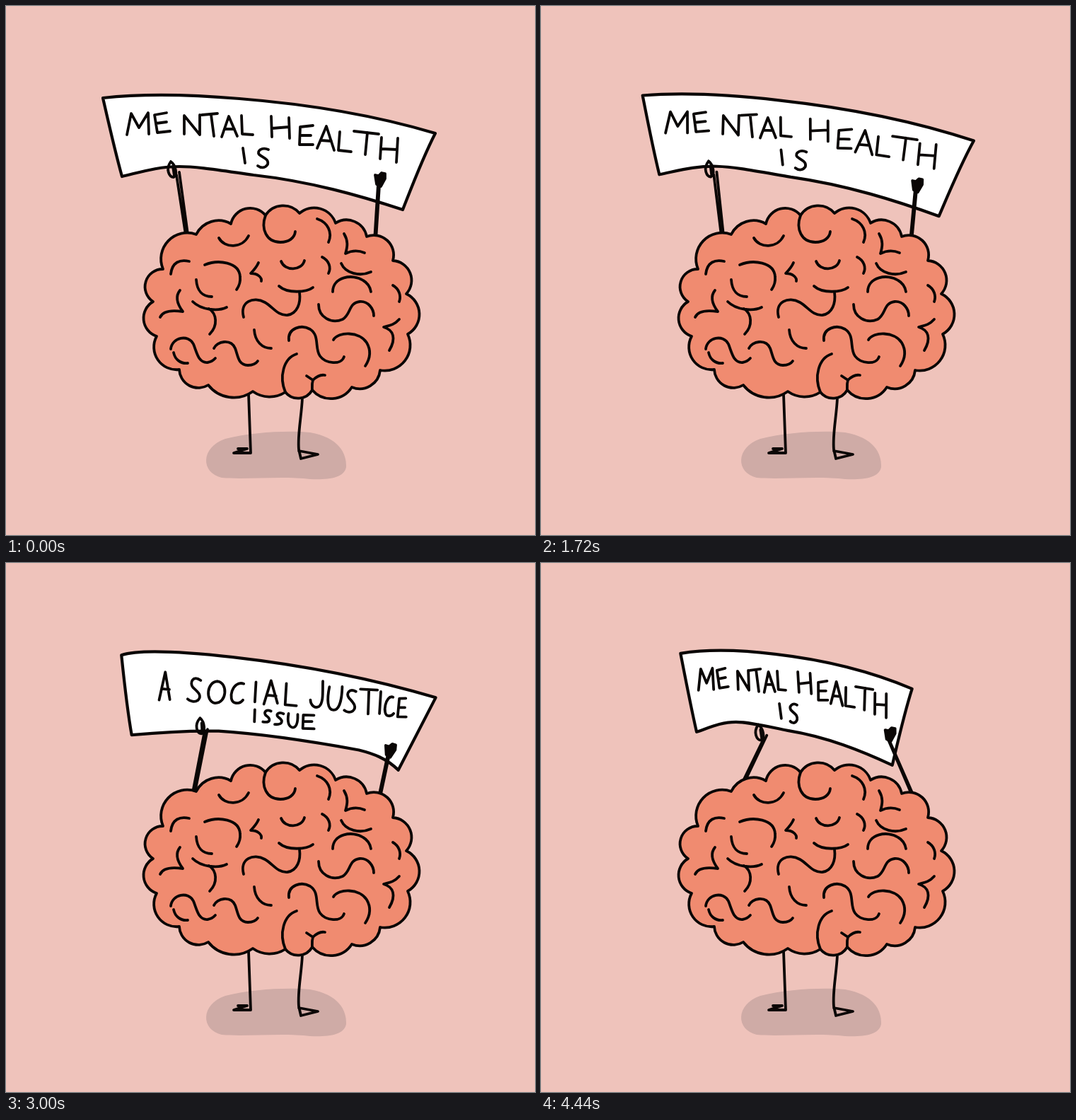
Animation, 748 px wide and 748 px high, one loop 4.48 s. Source, as an HTML page with a canvas:

```html
<!DOCTYPE html>
<html lang="en">
<head>
<meta charset="utf-8">
<title>Mental health is a social justice issue</title>
<style>
html, body { margin: 0; width: 100%; height: 100%; overflow: hidden; background: #efc3bb; }
canvas { display: block; width: 748px; height: 748px; }
</style>
</head>
<body>
<canvas id="stage" width="748" height="748" role="img" aria-label="A brain holds up a sign: Mental health is a social justice issue"></canvas>
<script>
const ctx = document.getElementById('stage').getContext('2d');
const INK = '#0a0605', LOOP = 4480, STEP = 40, LINE = 3.8;
const PIVOT = [256, 350], FLIP_X = 318;
const path = (...parts) => new Path2D(parts.join(''));

function draw(p, width, fill) {
  if (fill) { ctx.fillStyle = fill; ctx.fill(p); }
  if (width) { ctx.lineWidth = width; ctx.stroke(p); }
}

// Each bump: radius, end x, end y
const bumps = [
  [37, 269, 323], [35, 318, 308], [28, 367, 296], [30, 415, 293], [32, 466, 307],
  [29, 510, 326], [28, 547, 360], [28, 566, 407], [32, 568, 464], [36, 529, 515],
  [29, 489, 539], [35, 433, 543], [23, 395, 546], [41, 349, 545], [46, 286, 536],
  [27, 245, 514], [32, 213, 467], [27, 208, 418], [25, 222, 372]
];
const brain = path('M222 372', ...bumps.map(([r, x, y]) => `A${r} ${r} 0 0 1 ${x} ${y}`), 'Z');

const foldsTop = path(
  'M301 328C309 343 334 343 343 325',
  'M367 296C360 315 368 334 388 334C400 334 408 328 409 319',
  'M440 301C455 306 462 320 456 334',
  'M478 322C484 332 483 340 480 350C490 345 500 346 507 349',
  'M474 364C480 378 500 383 516 376',
  'M233 379C235 362 246 358 259 361',
  'M281 366C300 358 330 362 331 383C332 393 328 398 326 401',
  'M357 363C354 370 350 374 346 378C356 378 362 384 361 389',
  'M389 361C394 375 418 375 422 360',
  'M386 396C398 407 425 405 434 398',
  'M447 355C457 360 460 370 456 378');
const foldsMid = path(
  'M462 404C462 383 490 378 505 388C512 392 515 398 516 404',
  'M547 395C556 400 559 410 556 418',
  'M269 387C270 403 278 411 291 411',
  'M264 418C276 430 300 432 312 426',
  'M287 428C298 435 300 452 288 464',
  'M218 440C222 430 236 430 250 432C244 424 238 412 246 402',
  'M336 440C330 418 350 410 366 419C378 426 384 438 398 437C412 435 417 420 415 405',
  'M442 422C442 440 460 450 476 443C488 436 484 420 500 418C512 417 520 428 520 438');
const foldsLow = path(
  'M556 443C548 452 540 452 534 454C548 458 552 470 542 487',
  'M351 458C352 474 362 484 375 484',
  'M400 473C398 455 418 450 430 457C444 466 436 484 444 495C452 506 474 508 478 496',
  'M463 472C470 460 500 460 510 476C517 488 514 500 508 509',
  'M233 485C235 468 258 464 265 478C270 490 272 505 285 504C292 503 294 500 296 498',
  'M237 490C239 500 247 506 257 505',
  'M294 484C298 474 318 470 324 484C328 494 328 508 342 508C350 508 354 505 356 502',
  'M411 492C392 498 386 525 395 546',
  'M425 523L434 529C440 523 446 521 451 522M434 529C432 535 433 540 433 543');

const shadow = path('M310 612C350 602 400 600 430 603C470 610 482 632 481 652C478 668 455 670 430 669',
  'C390 664 340 670 305 667C275 660 275 624 310 612Z');
const legs = path('M343 549L346 632L322 632L341 626L328 626',
  'M419 554C418 580 412 605 414 627L417 640L441 634L414 629');

const signs = [
  {
    board: path('M137 130C190 124 260 125 330 131C430 139 520 154 607 180C589 215 574 255 561 288',
      'C500 268 430 248 350 239C300 232 270 227 245 227C215 227 190 235 164 241C154 205 145 165 137 130Z'),
    letters: [
      path('M171 182L177 152L188 172L201 151L202 181',            // MENTAL
        'M227 151L210 154L214 179L232 177M212 166L227 164',
        'M252 181L252 155L274 182L274 154', 'M277 154L299 152M290 154L294 184',
        'M305 185L315 156L327 184M309 174L323 174', 'M333 155L334 181L349 182'),
      path('M375 156L376 185M400 158L401 187M376 173L400 171',     // HEALTH
        'M434 169L416 171L415 196L434 196M416 183L431 183',
        'M440 201L453 170L464 204M446 190L460 191', 'M472 178L470 204L488 206',
        'M492 177L527 181M511 179L508 210', 'M531 186L529 216M554 187L552 221M531 202L553 203'),
      path('M335 201L338 222',                                     // IS
        'M371 203C362 199 354 205 358 210C364 215 372 216 370 224C366 230 360 229 356 226')
    ],
    left: [235, 231, 256, 330], right: [529, 244, 521, 332],
    swing: 4.74, rest: 0, start: 0
  },
  {
    board: path('M143 140C170 128 240 127 300 128C400 130 500 140 591 158C576 195 562 230 548 265',
      'C530 250 510 245 490 242C420 236 350 232 290 234C250 237 210 243 168 251C158 215 150 175 143 140Z'),
    letters: [
      path('M202 198L207 158L217 196M204 182L215 182',             // A SOCIAL
        'M258 165C246 158 242 170 248 176C256 182 262 186 257 193C252 197 246 196 242 193',
        'M282 164C266 166 267 194 281 195C298 194 297 165 282 164Z',
        'M319 164C302 160 298 190 309 192C314 193 318 190 320 187', 'M336 160L337 188',
        'M350 190L357 156L369 187M354 177L366 177', 'M379 158L380 188L396 188'),
      path('M430 150C431 165 434 180 428 186C422 190 416 185 415 178', // JUSTICE
        'M440 157C438 175 440 190 449 189C458 188 459 170 458 155',
        'M478 160C468 156 464 164 469 170C476 176 482 182 476 188C472 191 467 190 464 188',
        'M484 156L508 155M496 156L498 190', 'M513 157L514 188',
        'M531 163C520 160 517 190 527 190C531 190 533 188 534 186',
        'M549 163L540 164L540 190L552 189M540 177L549 176'),
      path('M338 199L339 216',                                     // ISSUE
        'M361 199C353 196 350 203 355 206C362 210 362 216 351 215',
        'M379 201C371 198 367 204 373 207C380 211 379 217 368 217',
        'M386 200C385 212 388 219 394 219C400 218 400 208 399 200',
        'M422 199L407 200L408 219L424 218M408 209L420 208')
    ],
    left: [264, 229, 262, 330], right: [534, 237, 521, 332],
    swing: 4.6, rest: -1.67, start: 2320
  }
];

function leftArm([x, y, bx, by], k) {
  x += 103 * k; y += 12 * k; bx += 28 * k;
  draw(path(`M${x + 6} ${y + 8}L${bx - 1} ${by}M${x + 10} ${y + 4}L${bx + 2} ${by}`), LINE);
  draw(path(`M${x - 2} ${y - 11}C${x - 10} ${y} ${x - 4} ${y + 11} ${x + 2} ${y + 11}`,
    `C${x + 8} ${y + 8} ${x + 5} ${y - 6} ${x - 2} ${y - 11}M${x + 1} ${y - 4}L${x + 3} ${y + 9}`), LINE);
}

function rightArm([x, y, bx, by], k) {
  x -= 49 * k; y -= 4 * k; bx += 7 * k;
  draw(path(`M${x - 3} ${y + 8}L${bx} ${by}M${x - 1} ${y + 10}L${bx + 2} ${by}`), LINE);
  draw(path(`M${x - 7} ${y - 5}L${x - 5} ${y + 8}L${x + 1} ${y + 11}`,
    `L${x + 7} ${y}L${x + 7} ${y - 7}L${x + 2} ${y - 8}L${x - 2} ${y - 4}Z`), LINE, INK);
}

function pose(t) {
  const turn = t >= 4324 ? (t - 4324) / 156 : t >= 2120 && t < 2320 ? (t - 2120) / 200 : 0;
  const sign = signs[t < 2220 || t >= 4400 ? 0 : 1];
  const local = t >= 4400 ? 0 : Math.min(1, Math.max(0, (t - sign.start) / 2000));
  return {
    sign, fold: Math.sin(Math.PI * turn), width: Math.abs(Math.cos(Math.PI * turn)),
    angle: sign.rest + sign.swing * (1 - Math.cos(2 * Math.PI * local))
  };
}

function drawSign({ sign, fold, width, angle }) {
  const squash = new DOMMatrix([width, 0, 0.05 * fold, 1, FLIP_X * (1 - width), -3 * fold]);
  const flipped = p => { const q = new Path2D(); q.addPath(p, squash); return q; };
  ctx.save();
  ctx.translate(...PIVOT);
  ctx.rotate(angle * Math.PI / 180);
  ctx.translate(-PIVOT[0], -PIVOT[1]);
  draw(flipped(sign.board), 4.2, '#fff');
  sign.letters.forEach(p => draw(flipped(p), LINE));
  leftArm(sign.left, fold);
  rightArm(sign.right, fold);
  ctx.restore();
}

function frame(now) {
  const t = Math.floor((now % LOOP) / STEP) * STEP;
  ctx.fillStyle = '#efc3bb';
  ctx.fillRect(0, 0, 748, 748);
  ctx.strokeStyle = INK;
  ctx.lineCap = ctx.lineJoin = 'round';
  draw(shadow, 0, '#cfaba6');
  draw(legs, LINE);
  drawSign(pose(t));
  draw(brain, LINE, '#f08b70');
  [foldsTop, foldsMid, foldsLow].forEach(p => draw(p, LINE));
  requestAnimationFrame(frame);
}
frame(0);
</script>
</body>
</html>
```
